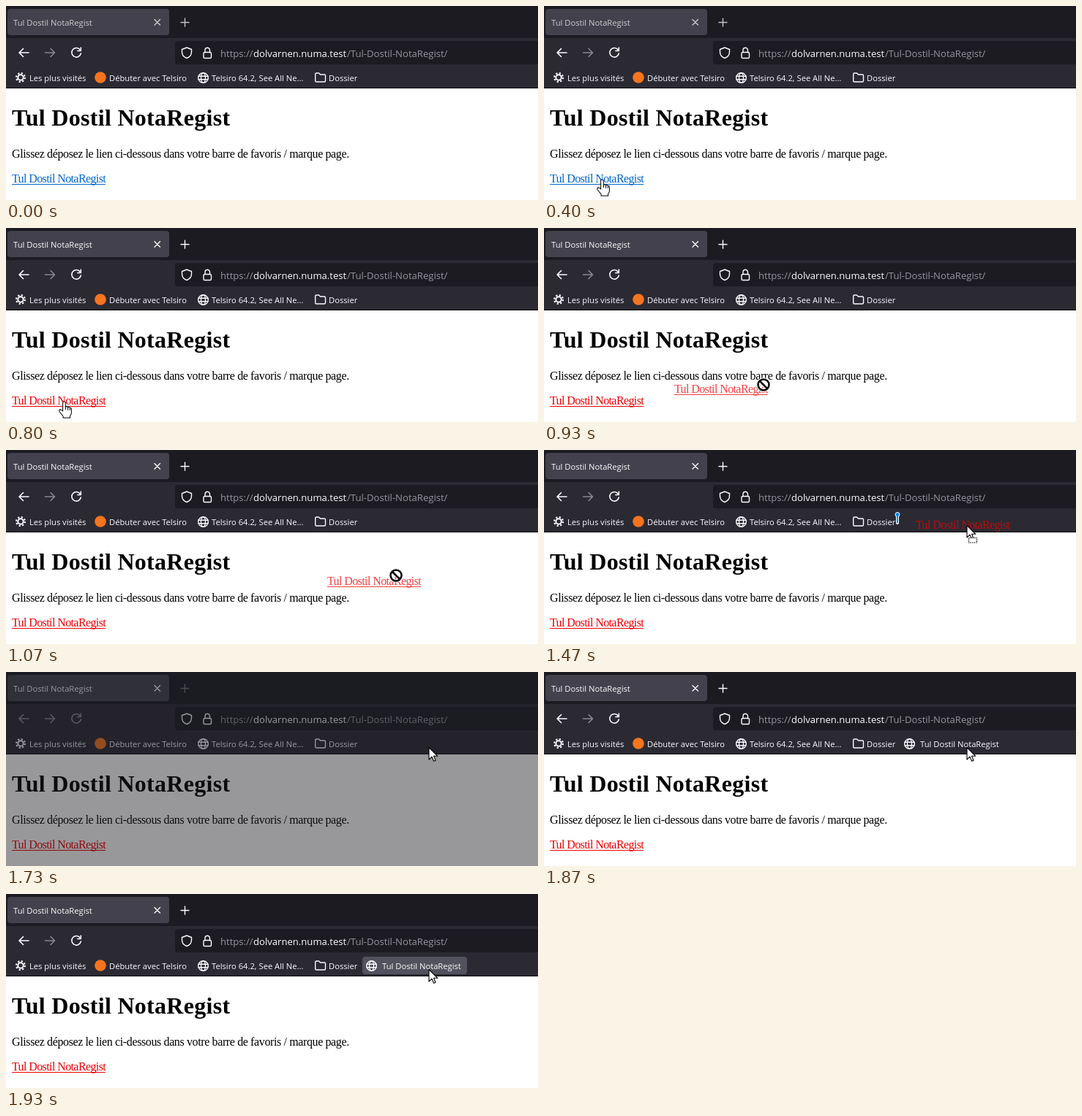
An HTML page for the animation above (3 s loop, 727 by 266 pixels).

```html
<!DOCTYPE html>
<html lang="fr">
<head>
<meta charset="utf-8">
<title>Glisser un lien</title>
<style>
  html, body { margin: 0; width: 100%; height: 100%; overflow: hidden; background: #fff; }
  svg { display: block; width: 100vw; height: 100vh; }
  text { white-space: pre; }
  .ui { font: 11.2px "Open Sans", "Noto Sans", sans-serif; fill: #fbfbfe; }
  .url { font-size: 13.1px; }
  .muted { fill: #96959c; }
  .page { font: 16px "Liberation Serif", serif; letter-spacing: -.38px; }
  .page.link { letter-spacing: -.6px; }
  .title { font: bold 32px "Liberation Serif", serif; letter-spacing: .3px; }
  .icon { fill: none; stroke: #fbfbfe; stroke-width: 1.4; stroke-linecap: round; stroke-linejoin: round; }
  .strong { stroke-width: 1.6; }
  .cursor path, .cursor rect { fill: #fff; stroke: #000; stroke-width: 1.1; stroke-linejoin: round; }
</style>
</head>
<body>
<svg viewBox="0 0 727 266">
  <defs>
    <g id="globe" class="icon">
      <circle r="6.8"/>
      <ellipse rx="3" ry="6.8"/>
      <path d="M-6.5-2.2H6.5M-6.5 2.2H6.5"/>
    </g>
  </defs>

  <rect width="727" height="266" fill="#fff"/>
  <rect width="727" height="44" fill="#1c1b22"/>
  <rect y="44" width="727" height="68" fill="#2b2a33"/>
  <rect y="112" width="727" height="1" fill="#0c0c0d"/>

  <rect x="2" y="4" width="221" height="36" rx="4" fill="#42414d"/>
  <g id="tabLabels">
    <text class="ui name" x="10" y="26.5"></text>
    <path class="icon" d="M203 18.5l7.5 7.5m0-7.5l-7.5 7.5"/>
    <path id="plus" class="icon" d="M239 22.5h11m-5.5-5.5v11"/>
  </g>

  <g class="icon strong">
    <g id="nav">
      <path d="M31 64H18m5.5-5.5L18 64l5.5 5.5"/>
      <path d="M101.5 60.5a6.3 6.3 0 1 0 .8 4.5M102.3 57v4.5h-4.5"/>
    </g>
    <path opacity=".45" d="M53.5 64h13m-5.5-5.5l5.5 5.5-5.5 5.5"/>
  </g>
  <path d="M235 48H727V80H235a4 4 0 0 1-4-4V52a4 4 0 0 1 4-4Z" fill="#1c1b22"/>
  <g class="icon">
    <path d="M247 57l6.5 2.5v3.5q0 6-6.5 8.5-6.5-2.5-6.5-8.5v-3.5Z"/>
    <rect x="270" y="63.5" width="10.5" height="8" rx="1.5"/>
    <path d="M272 63.5v-3a3.2 3.2 0 0 1 6.5 0v3"/>
  </g>
  <text class="ui url muted" x="293" y="70">https://</text>
  <text class="ui url" x="338" y="70">dolvarnen.numa.test</text>
  <text class="ui url muted" x="466" y="70">/Tul-Dostil-NotaRegist/</text>

  <g class="icon">
    <circle cx="20" cy="98" r="3.7" stroke-width="2"/>
    <circle cx="20" cy="98" r="5.9" stroke-width="2.2" stroke-linecap="butt" stroke-dasharray="2.2 2.434"/>
    <path d="M422.7 102.500v-9q0-1.500 1.500-1.500h3.300l2 2h5.500q1.500 0 1.500 1.500v7q0 1.500-1.500 1.500h-10.800q-1.500 0-1.500-1.500Z"/>
  </g>
  <circle cx="129" cy="98" r="7.8" fill="#f5751f"/>
  <use href="#globe" x="269.5" y="98.5"/>
  <text class="ui" x="32" y="102.7">Les plus visités</text>
  <text class="ui" x="141" y="102.7">Débuter avec Telsiro</text>
  <text class="ui" x="281" y="102.7">Telsiro 64.2, See All Ne...</text>
  <text class="ui" x="441" y="102.7">Dossier</text>

  <g id="saved">
    <rect id="hover" x="487" y="86" width="143" height="24" rx="4" fill="#52525e"/>
    <use href="#globe" x="499.5" y="98.5"/>
    <text class="ui name" x="514" y="102.7"></text>
  </g>

  <text class="title name" x="8" y="164"></text>
  <text class="page" x="8" y="208">Glissez déposez le lien ci-dessous dans votre barre de favoris / marque page.</text>
  <g id="link">
    <text class="page link name" x="8" y="242"></text>
    <rect x="8" y="244" width="128" height="1"/>
  </g>

  <rect id="dim" width="727" height="266" fill="#1c1b22" opacity=".45"/>

  <g id="ghost" fill="#e00" opacity=".75">
    <text class="page link name" x="8" y="242"></text>
    <rect id="ghostLine" x="8" y="244" width="128" height="1"/>
  </g>

  <g id="marker">
    <path d="M483 89V100" stroke="#fff" stroke-width="4" stroke-linecap="round"/>
    <circle cx="483" cy="88.5" r="3" fill="#0a84e0" stroke="#fff"/>
    <path d="M483 90V100" stroke="#0a84e0" stroke-width="2"/>
  </g>

  <g id="hand" class="cursor">
    <g transform="scale(.93)">
      <path d="M-1.5 14V2a2 2 0 0 1 4 0V8q2-1.5 3.5.5 2-1 3 .8 2.2-.6 2.2 2V16q0 3-2 5V24H-1V21.5Q-4 18-6.5 14.5q-.8-2.5 1.6-2.8Q-3 12-1.5 14Z"/>
      <path d="M2.5 8v4M6 9v3.5M9 10v3"/>
    </g>
  </g>
  <g id="arrow" class="cursor">
    <path d="M0 .5V17L4 13.2 6.6 19.3 9 18.3 6.5 12.3H11.8Z"/>
    <rect id="badge" x="2.5" y="17.5" width="11" height="6.5" stroke-dasharray="1.5 1"/>
  </g>
  <g id="forbidden" fill="none">
    <g stroke="#fff" stroke-width="4.5"><circle r="7.5"/><path d="M-5-5L5 5"/></g>
    <g stroke="#000" stroke-width="2.5"><circle r="7.5"/><path d="M-5-5L5 5"/></g>
  </g>
</svg>
<script>
  const LOOP = 3000;
  const PRESS = 800, DRAG_START = 870, OVER_BAR = 1330, DROP = 1730, SAVED = 1870, HOVER = 1930;

  // time, cursor, cursor x, cursor y, drag image dx, dy
  const steps = [
    [0, null, 0, 0],
    [200, 'arrow', 88, 257],
    [270, 'arrow', 84, 249],
    [330, 'hand', 80, 240],
    [400, 'hand', 79, 238],
    [870, 'forbidden', 168, 230, 50, -4],
    [930, 'forbidden', 300, 215, 170, -16],
    [1000, 'forbidden', 434, 193, 310, -37],
    [1070, 'forbidden', 533, 172, 431, -57],
    [1130, 'forbidden', 562, 152, 474, -77],
    [1200, 'forbidden', 575, 135, 494, -98],
    [1270, 'forbidden', 578, 123, 499, -113],
    [1330, 'arrow', 578, 111, 500, -123],
    [1400, 'arrow', 578, 105, 500, -130],
    [1470, 'arrow', 578, 103, 500, -134]
  ];

  const $ = id => document.getElementById(id);
  const show = (id, on) => $(id).style.display = on ? '' : 'none';
  const move = (id, x, y) => $(id).setAttribute('transform', `translate(${x} ${y})`);
  const fade = (id, opacity) => $(id).setAttribute('opacity', opacity);

  document.querySelectorAll('.name').forEach(el => el.textContent = 'Tul Dostil NotaRegist');

  function draw(t) {
    const [, cursor, x, y, dx, dy] = steps.findLast(s => s[0] <= t);
    const pressed = t >= PRESS;
    const dragging = t >= DRAG_START && t < DROP;
    const overBar = t >= OVER_BAR && t < DROP;
    const dimmed = t >= DROP && t < SAVED;

    for (const id of ['hand', 'arrow', 'forbidden']) {
      show(id, id === cursor);
      move(id, x, y);
    }
    show('badge', overBar);
    show('marker', overBar);
    show('ghost', dragging);
    show('ghostLine', !overBar);
    if (dragging) move('ghost', dx, dy);

    show('dim', dimmed);
    show('saved', t >= SAVED);
    show('hover', t >= HOVER);
    fade('tabLabels', pressed ? 1 : .75);
    fade('plus', dimmed ? .4 : 1);
    fade('nav', dimmed ? .45 : 1);
    $('link').setAttribute('fill', pressed ? '#e00' : '#0066cc');
  }

  const start = performance.now();
  function tick() {
    draw((performance.now() - start) % LOOP);
    requestAnimationFrame(tick);
  }
  tick();
</script>
</body>
</html>
```
